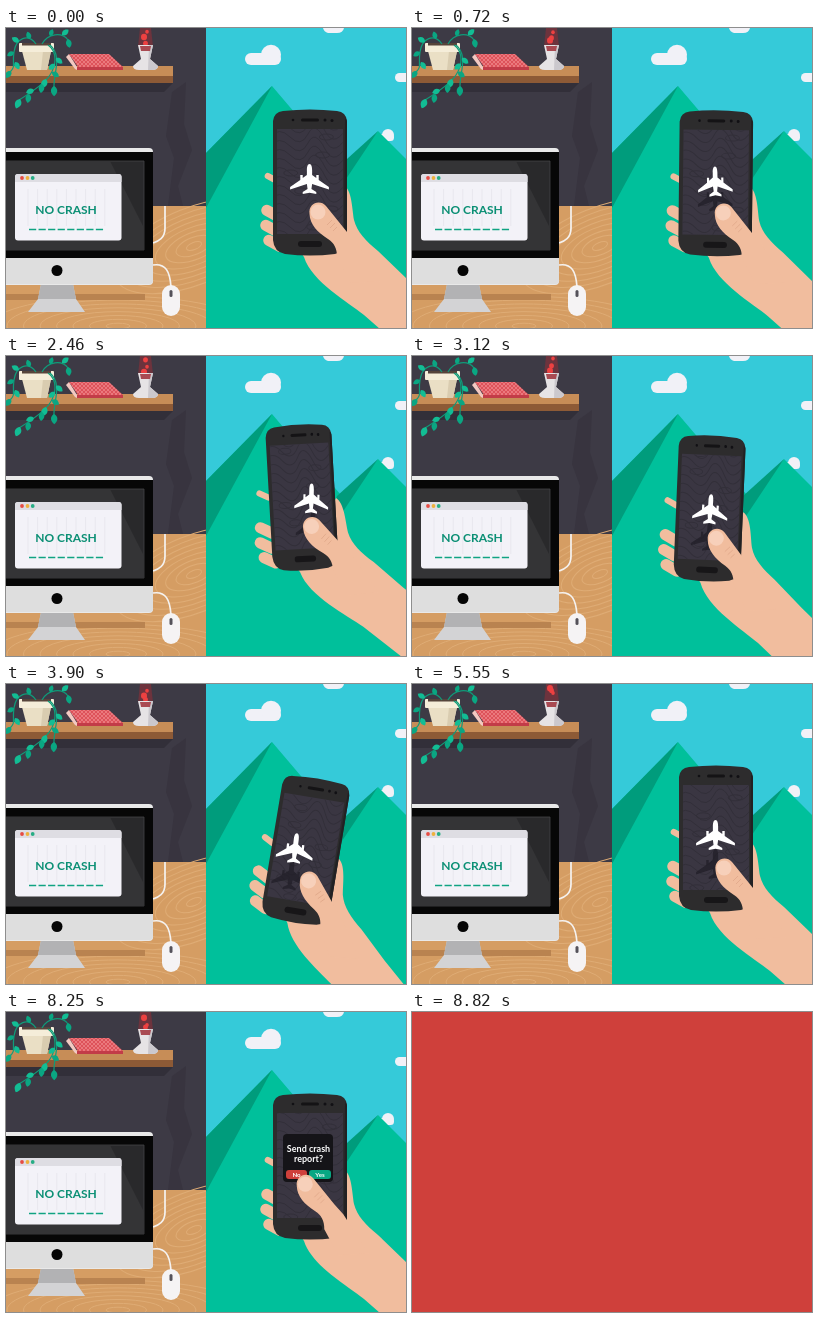
Write an HTML page that moves like this. It is 400 by 300 pixels and loops after 8.94 s.

```html
<!DOCTYPE html>
<html lang="en">
<head>
<meta charset="utf-8">
<title>No crash</title>
<style>
html, body { margin: 0; width: 100%; height: 100%; overflow: hidden; background: #3d3a45; }
svg { display: block; width: 100vw; height: 100vh; }
text { font-family: Lato, "Open Sans", sans-serif; font-weight: 700; text-anchor: middle; }
</style>
</head>
<body>
<svg viewBox="0 0 400 300" xmlns="http://www.w3.org/2000/svg">
  <defs>
    <pattern id="weave" width="4" height="4" patternUnits="userSpaceOnUse">
      <rect width="4" height="4" fill="#dd525a"/><path d="M0 0L4 4M4 0L0 4" stroke="#f08a8e" stroke-width=".7"/>
    </pattern>
    <clipPath id="leftHalf"><rect width="200" height="300"/></clipPath>
    <clipPath id="rightHalf"><rect x="200" width="200" height="300"/></clipPath>
    <clipPath id="display"><rect x="271" y="101" width="66" height="105"/></clipPath>
    <path id="jet" d="M0-15C2-15 2.7-12 2.7-9V-4L7-1V-4H9.5V1L20 8V10.5L2.7 5L2 10L7 13V15L0 13.8L-7 15V13L-2 10L-2.7 5L-20 10.5V8L-9.5 1V-4H-7V-1L-2.7-4V-9C-2.7-12-2-15 0-15Z"/>
    <path id="leaf" d="M0 0C-5 3-5 8 0 12C5 8 5 3 0 0Z"/>
  </defs>

  <g clip-path="url(#leftHalf)">
    <rect width="200" height="300" fill="#3d3a45"/>
    <path d="M166 64L180 54L178 96L186 122L172 158L177 178H162L168 130L160 108Z" fill="#38343f"/>
    <path d="M0 55H167L158 64H0Z" fill="#322f39"/>

    <rect y="38" width="167" height="11" fill="#c78d57"/>
    <rect y="48" width="167" height="7" fill="#8d5a36"/>

    <path d="M60 29L63 26L71 39V42L69 41Z" fill="#f3c9c2"/>
    <path d="M63 26H103L117 39H72Z" fill="url(#weave)"/>
    <path d="M71 39H117V42H71Z" fill="#c23c48"/>

    <path d="M134 0H145L147 19H132Z" fill="#6d333d"/>
    <g id="lava" fill="#ed4141"></g>
    <path d="M132 17H147L144 31L152 38Q152 42 146 42H133Q127 42 127 38L135 31Z" fill="#e6e3e5"/>
    <path d="M143 17H147L144 31L152 38Q152 42 146 42H142Z" fill="#cbc8cd"/>
    <path d="M134 18H145L144 23H135Z" fill="#a94a52"/>

    <path d="M16 23H45L41 42H21Z" fill="#eadfc5"/>
    <path d="M37 23H45L41 42H35Z" fill="#d9ccb0"/>
    <rect x="13" y="15" width="35" height="9" rx="1" fill="#f5edd9"/>
    <rect x="16" y="15" width="29" height="2.5" fill="#56443b"/>
    <g id="plant"></g>

    <rect y="178" width="200" height="122" fill="#d59d63"/>
    <g id="grain" fill="none" stroke="#dfac75" stroke-width="1"></g>
    <path d="M159 178V200C159 210 153 213 147 215M147 237C160 235 164 244 165 259" fill="none" stroke="#f5f2f0" stroke-width="1.7"/>
    <rect x="156" y="257" width="18" height="31" rx="9" fill="#f5f3f4"/>
    <rect x="163.5" y="262" width="3" height="7" rx="1.5" fill="#55525a"/>

    <rect y="266" width="139" height="6" fill="#b98350"/>
    <path d="M35 256H67L70 271L79 284H22L32 271Z" fill="#d3d3d5"/>
    <path d="M35 256H67L70 271H32Z" fill="#b2b2b4"/>
    <path d="M0 120H143Q147 120 147 124V253Q147 257 143 257H0Z" fill="#e9e9e9"/>
    <path d="M0 124H147V230H0Z" fill="#070707"/>
    <path d="M0 230H147V253Q147 256 143 256H0Z" fill="#dedede"/>
    <path d="M-1 133H138V222H-1Z" fill="#29292b" stroke="#454547" stroke-width=".8"/>
    <path d="M0 133H104L138 200V222H0Z" fill="#343436"/>
    <circle cx="51" cy="242.5" r="5.5" fill="#050505"/>

    <rect x="9" y="146" width="106.5" height="66.5" rx="3" fill="#f3f2f8"/>
    <path d="M9 154V149Q9 146 12 146H112.500Q115.500 146 115.500 149V154Z" fill="#dedde3"/>
    <circle cx="16" cy="150" r="1.9" fill="#e64c43"/><circle cx="21.500" cy="150" r="1.9" fill="#eeb13d"/><circle cx="26.700" cy="150" r="1.9" fill="#27ad85"/>
    <path id="rules" stroke="#e8e7ee" stroke-width="1"/>
    <text x="60" y="185.800" font-size="12" fill="#0b8f74">NO CRASH</text>
    <path d="M23 201.500H98" stroke="#10a382" stroke-width="1.500" stroke-dasharray="7.200 2.350"/>
  </g>

  <g clip-path="url(#rightHalf)">
    <rect x="200" width="200" height="300" fill="#35cad9"/>
    <g id="clouds">
      <path d="M317 0H338Q337 5 331 5H322Q318 4 317 0Z" fill="#f1f1f7"/>
    </g>
    <path d="M266 58L340 145L372 103L400 131V300H200V125Z" fill="#00c09b"/>
    <path d="M266 58L200 125V180Z" fill="#009c7c"/>
    <path d="M372 103L331 140L320 181Z" fill="#009c7c"/>

    <g id="hand">
      <g fill="#f1bd9e">
        <path d="M325 180L338 157C346 163 346 180 348 192C351 204 360 213 372 223L400 250L470 312V385L358 287C342 274 306 254 298 229L282 206Z"/>
        <g id="fingers"></g>
      </g>
      <g id="phone">
        <path d="M267 93Q268 84 277 83Q304 80 331 83Q340 84 341 93V212Q340 224 329 226Q304 229 279 226Q268 224 267 212Z" fill="#2d2c2d"/>
        <path d="M339 90Q341 91 341 95V212Q340 222 333 225Q338 219 338 211Z" fill="#222123"/>
        <rect x="295" y="90.500" width="18" height="3" rx="1.500" fill="#141315"/>
        <circle cx="319" cy="92" r="1.500" fill="#111014"/><circle cx="326" cy="92.500" r="1.500" fill="#111014"/><circle cx="287" cy="92" r="1.300" fill="#111014"/>
        <rect x="292" y="213" width="24" height="6" rx="3" fill="#171618"/>
        <rect x="271" y="101" width="66" height="105" fill="#3a3642"/>
        <g clip-path="url(#display)">
          <g id="terrain" fill="none" stroke="#322f39" stroke-width="1"></g>
          <use id="shadow" href="#jet" fill="#211e27"/>
          <use id="plane" href="#jet" fill="#fff"/>
        </g>
        <g id="dialog">
          <rect x="277" y="122" width="50" height="48" rx="4" fill="#151418"/>
          <text x="302.500" y="139.500" font-size="9" fill="#fff">Send crash</text>
          <text x="302.500" y="149.500" font-size="9" fill="#fff">report?</text>
          <rect x="280" y="158" width="21" height="9" rx="3" fill="#cf403b"/>
          <rect x="303" y="158" width="22" height="9" rx="3" fill="#07a783"/>
          <text x="290.500" y="164.800" font-size="6.200" fill="#fff">No</text>
          <text x="314" y="164.800" font-size="6.200" fill="#fff">Yes</text>
        </g>
      </g>
      <g id="thumb">
        <path d="M303.500 186C302 175 314 171 320 178L341 204L350 214L375 253L345 255L331 229C331 220 328 215 322 211C311 204 304 196 303.500 186Z" fill="#f1bd9e"/>
        <circle cx="312" cy="184" r="7.500" fill="#f7d0ba"/>
        <path d="M321 197L326 192M324 200L329 195M327 203L331 199" stroke="#dda486" stroke-width=".7"/>
      </g>
    </g>
  </g>
  <circle id="wipe" cx="290.500" cy="162.500" r="0" fill="#cf403b"/>
</svg>

<script>
const LOOP = 8940;
const $ = id => document.getElementById(id);
const set = (el, attrs) => { for (const k in attrs) el.setAttribute(k, attrs[k]); };
const add = (parent, tag, attrs) => {
  const el = document.createElementNS("http://www.w3.org/2000/svg", tag);
  set(el, attrs);
  return parent.appendChild(el);
};
const clamp = v => Math.max(0, Math.min(1, v));
const smooth = v => v * v * (3 - 2 * v);
const span = (t, a, b) => clamp((t - a) / (b - a));

// Rows are [time, ...values], eased between neighbours.
function track(t, rows) {
  let i = 0;
  while (i < rows.length - 2 && t > rows[i + 1][0]) i++;
  const [a, b] = [rows[i], rows[i + 1]];
  const p = smooth(span(t, a[0], b[0]));
  return a.slice(1).map((v, k) => v + (b[k + 1] - v) * p);
}

function cloud(x, y, width, height, bump) {
  const fill = "#f1f1f7";
  add($("clouds"), "rect", { x, y, width, height, rx: height / 2, fill });
  add($("clouds"), "circle", { cx: x + width - bump, cy: y + height * .15, r: bump, fill });
}
cloud(239, 25, 36, 12, 10);
cloud(389, 45, 22, 9, 5);
cloud(373, 106, 15, 7, 6);

for (let i = 0; i < 8; i++) {
  const r = 8 + i * 11;
  add($("grain"), "ellipse", { cx: 188, cy: 218, rx: r, ry: r * .45, transform: "rotate(-22 188 218)" });
  add($("grain"), "ellipse", { cx: 112, cy: 298, rx: r * 1.5, ry: r * .35 });
}
$("rules").setAttribute("d", Array.from({ length: 9 }, (_, i) => `M${22 + i * 9.6} 161V198`).join(""));

[[263, 152, 10], [261, 183, 18], [260, 198, 18], [263, 213, 18]].forEach(([x, y, w]) =>
  add($("fingers"), "rect", { x: x - 6, y: y - 6, width: w + 6, height: w * .62, rx: w * .31, transform: `rotate(28 ${x} ${y})` }));

for (let i = -9; i < 18; i++) {
  const y = 100 + i * 9;
  add($("terrain"), "path", { d: `M264 ${y}q9-11 20 0t18-3t17 6t25-9` });
  if (i % 2) add($("terrain"), "ellipse", { cx: 304 + 22 * Math.sin(i * 2.3), cy: y, rx: 7, ry: 3 });
}

// Vines and leaves: x, y, angle, scale.
const stems = ["M30 16C22 5 10 10 8 24S10 38 4 44", "M42 17C52 24 50 38 44 47S26 64 13 72", "M44 17C57 28 47 46 48 60", "M36 16C42 5 56 4 62 12"];
stems.forEach(d => add($("plant"), "path", { d, fill: "none", stroke: "#0f9c7a", "stroke-width": 1.2 }));
const leaves = [
  [24, 11, 160, .65], [13, 14, 120, .7], [8, 24, 60, .65], [9, 34, -30, .7], [5, 43, 40, .75],
  [49, 36, 50, .7], [46, 44, -55, .7], [40, 51, 20, .8], [36, 56, 5, .75], [28, 62, 70, .7],
  [23, 66, 10, .75], [14, 71, 25, .85], [48, 58, 0, .85], [50, 30, -50, .7], [44, 8, 200, .6],
  [56, 7, 230, .7], [62, 11, -10, .75]
].map(([x, y, a, s], i) => ({
  x, y, a, s, el: add($("plant"), "use", { href: "#leaf", fill: i % 2 ? "#12bd94" : "#0aa682" })
}));
const bubbles = [0, 1, 2].map(i => add($("lava"), "ellipse", { cx: 138 + i * 1.5 }));

// Hand position, tilt, and how far the phone turns away (width factor).
const handRows = [
  [0, 304, 155, 0, 1], [500, 304, 155, 0, 1], [1500, 301.5, 161.5, 5, .94],
  [2460, 296, 142, -3.2, .89], [3900, 299.5, 167, 9.5, .92], [5300, 304, 155, 0, 1]
];
// Plane position on the display, angle, height above ground, wingspan, scale.
const planeRows = [
  [0, 0, -4, 0, 0, .97, 1], [1300, 0, -1, -3, 25, .8, 1], [1500, 0, -1, -3, 25, .8, 1],
  [2460, 11, 1, 5, 27, .95, 1], [3900, -11, -1, -3, 27, 1, 1], [5300, 0, -4, 0, 29, .97, 1],
  [5600, 0, -4, 0, 29, .97, 1], [6150, 0, 20, 150, 0, .97, 0]
];

function draw(t) {
  const [hx, hy, tilt, width] = track(t, handRows);
  const shake = Math.sin(Math.PI * span(t, 6000, 6300)) * Math.sin(t / 18) * 1.5;
  set($("hand"), { transform: `translate(${hx + shake} ${hy}) rotate(${tilt}) translate(-304 -155)` });
  set($("phone"), { transform: `translate(304 0) scale(${width} 1) translate(-304 0)` });

  const [px, py, turn, lift, wings, size] = track(t, planeRows);
  const pose = dy => `translate(${303.5 + px} ${155 + py + dy}) rotate(${turn}) scale(${size * wings} ${size})`;
  set($("plane"), { transform: pose(0) });
  set($("shadow"), { transform: pose(lift), opacity: .75 * clamp(lift / 10) });
  set($("terrain"), { transform: `translate(0 ${60 * smooth(span(t, 600, 6000))})` });

  const pop = span(t, 6080, 6300);
  const grow = smooth(pop) + .12 * Math.sin(pop * Math.PI);
  set($("dialog"), {
    transform: `translate(302 146) scale(${grow}) translate(-302 -146)`,
    visibility: pop ? "visible" : "hidden"
  });

  const tap = smooth(span(t, 7950, 8280));
  set($("thumb"), { transform: `translate(${-13 * tap} ${-12 * tap})` });

  const phase = t / LOOP * Math.PI * 2;
  leaves.forEach((l, i) => {
    const sway = 2 * Math.sin(phase * 3 + i);
    set(l.el, { transform: `translate(${l.x} ${l.y}) rotate(${l.a + sway}) scale(${l.s})` });
  });
  bubbles.forEach((b, i) => set(b, {
    cy: 9 + 7 * Math.sin(phase * (i + 1) + i * 2), rx: 3 - i * .6, ry: 3.2 - i * .6
  }));

  set($("wipe"), { r: 340 * Math.pow(span(t, 8350, 8800), 1.5) });
}

const start = performance.now();
function frame() {
  draw((performance.now() - start) % LOOP);
  requestAnimationFrame(frame);
}
frame();
</script>
</body>
</html>
```
